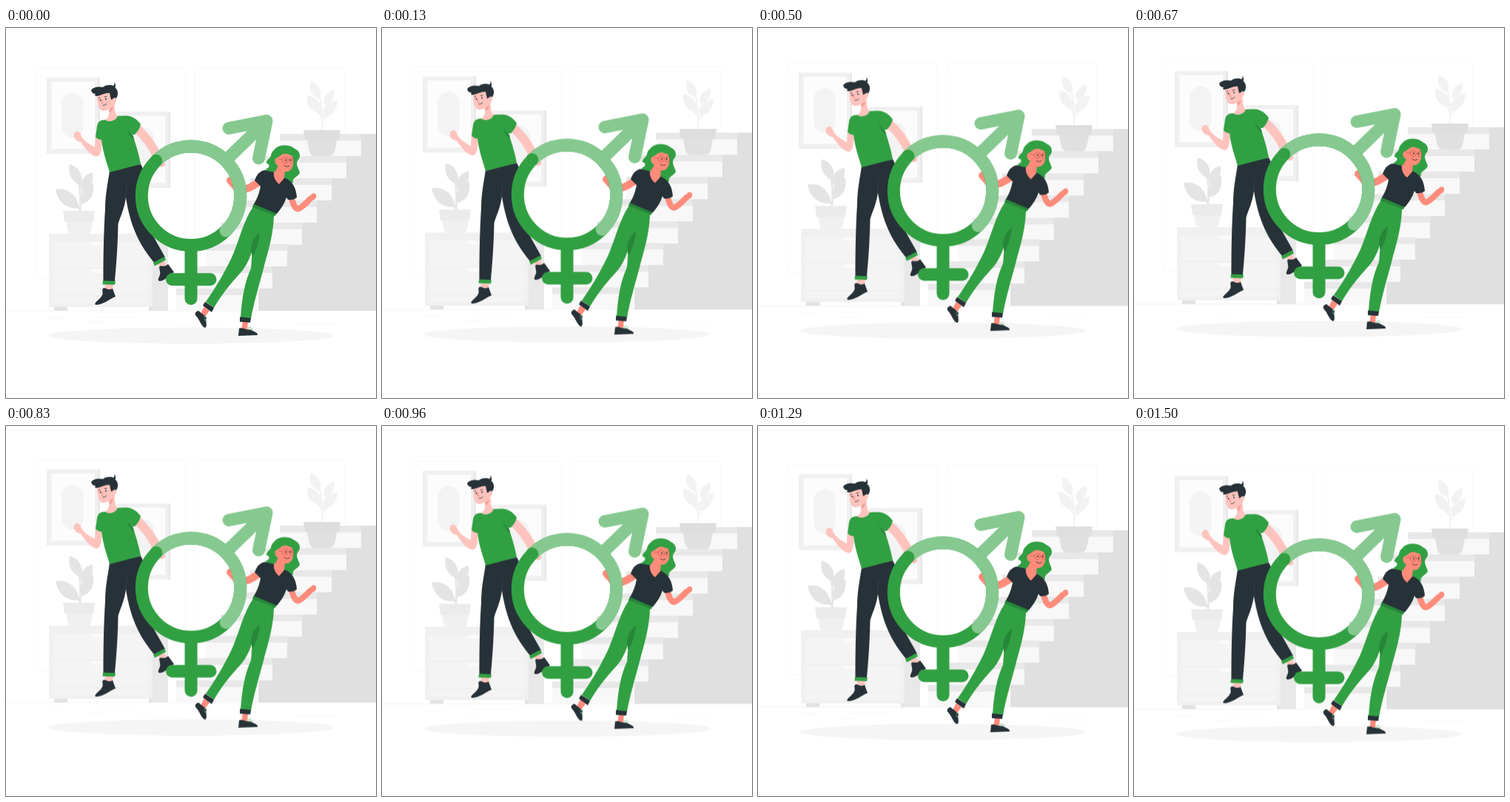
An HTML page without scripts for the animation above (1540 ms loop, 500 px wide and 500 px high).

```html
<!DOCTYPE html>
<html lang="en">
<head>
<meta charset="utf-8">
<title>Floating equality scene</title>
<style>
  html, body { margin: 0; width: 100%; height: 100%; overflow: hidden; background: #fff; }
  svg { display: block; width: 100vw; height: 100vh; }

  .scene { animation: float 1540ms -5ms infinite; }
  @keyframes float {
    0% { transform: translateY(0); animation-timing-function: steps(18); }
    48.64% { transform: translateY(-10px); }
    48.65% { transform: translateY(-9.44px); animation-timing-function: steps(19); }
    100% { transform: translateY(1.11px); }
  }

  .green { fill: #31a042; }
  .shade { fill: #27863a; }
  .dark { fill: #263238; }
  .pale { fill: #ffc3bd; }
  .tan { fill: #ff8b7b; }
  .line { fill: none; stroke-linecap: round; stroke-linejoin: round; }
  .pale-line { stroke: #ffc3bd; }
  .tan-line { stroke: #ff8b7b; }
  .ink { stroke: #263238; stroke-width: .8; }
  .symbol { stroke-width: 17; }
  .deep { stroke: #31a042; }
  .light { stroke: #86c990; }
</style>
</head>
<body>
<svg viewBox="0 0 500 500">
  <defs>
    <g id="step">
      <path fill="#f8f8f8" d="M370 143h110v30H370z"/>
      <path fill="#e8e8e8" d="M370 143h110v9H370z"/>
    </g>
    <g id="picture">
      <path fill="#e8e8e8" d="M55.500 67h71.500v103H55.500z"/>
      <path fill="#f0f0f0" d="M55.500 67h69v103h-69z"/>
      <path fill="#fcfcfc" d="M61 72.500h59v91H61z"/>
      <rect x="75.500" y="88" width="29" height="60" rx="14.500" fill="#f3f3f3"/>
    </g>
    <g id="drawer">
      <path fill="#f4f4f4" d="M63 289h130v35H63z"/>
      <path fill="#fafafa" d="M114 289h18v5h-13q-4 0-5-5z"/>
    </g>
  </defs>

  <g class="scene">
    <g fill="none" stroke="#f8f8f8">
      <rect x="39" y="54" width="203" height="284" rx="4"/>
      <rect x="255" y="54" width="203" height="284" rx="4"/>
      <path stroke="#f1f1f1" d="M0 382h500"/>
      <path d="M57 391.500h23M110 397.500h26M120 390.500h58M392 399.500h56"/>
    </g>

    <use href="#picture"/>
    <use href="#picture" x="95" y="46"/>

    <g id="stairs">
      <path fill="#e0e0e0" d="M480 143h20v239H341v-30h19v-30h20v-30h20v-29h20v-30h20v-30h20v-30h20z"/>
      <use href="#step"/>
      <use href="#step" x="-20" y="30"/>
      <use href="#step" x="-40" y="60"/>
      <use href="#step" x="-60" y="90"/>
      <use href="#step" x="-80" y="120"/>
      <use href="#step" x="-100" y="149"/>
      <use href="#step" x="-120" y="179"/>
      <use href="#step" x="-140" y="209"/>
    </g>

    <g id="stair-plant">
      <path class="line" stroke="#f0f0f0" stroke-width="1.600" d="M427 140C428 120 427 100 421 86M428 113l10-14M427 127l12-13M427 122l-9-14"/>
      <g fill="#f2f2f2">
        <path d="M412 72C423 76 428 86 424 95C413 93 408 83 412 72z"/>
        <path d="M444 83C445 94 440 103 430 104C427 95 433 86 444 83z"/>
        <path d="M407 91C419 93 428 102 427 116C413 115 405 104 407 91z"/>
        <path d="M448 97C448 110 441 119 429 121C427 109 435 100 448 97z"/>
      </g>
      <path fill="#e0e0e0" d="M406 148h42l-4 19q-2 6-8 6h-18q-6 0-8-6z"/>
      <path fill="#dedede" d="M402 138h50l-2 13h-46z"/>
    </g>

    <g id="cabinet">
      <path fill="#e2e2e2" d="M65 376h18v6H65zM193 376h26v6h-26z"/>
      <path fill="#f0f0f0" d="M58 278h140v99H58z"/>
      <path fill="#e8e8e8" d="M198 278h21v104h-21z"/>
      <use href="#drawer"/>
      <use href="#drawer" y="37"/>
      <path fill="#f4f4f4" d="M63 363h130v9H63z"/>
    </g>

    <g id="cabinet-plant">
      <path class="line" stroke="#e4e4e4" stroke-width="2.500" d="M100 250C101 228 101 214 97 199M100 232l10-16M100 245l-14-14"/>
      <g fill="#e4e4e4">
        <path d="M86 184C98 187 105 198 102 213C89 209 83 197 86 184z"/>
        <path d="M117 195C119 208 114 217 102 220C99 207 105 198 117 195z"/>
        <path d="M67 218C83 215 96 225 99 243C83 246 70 236 67 218z"/>
        <path d="M118 209C120 225 114 235 102 238C99 221 106 212 118 209z"/>
      </g>
      <path fill="#f0f0f0" d="M81 260h36l-2 13q-1 6-7 6H90q-6 0-7-6z"/>
      <path fill="#ebebeb" d="M77 247h43l-2 15H79z"/>
    </g>

    <ellipse cx="250" cy="415.700" rx="193.500" ry="11" fill="#f5f5f5"/>

    <g id="man">
      <path class="pale" d="M133 345h12l-1 9-9 1zM205 318l8-4 5 9-8 3z"/>
      <path class="dark" d="M131 352C134 349 137 356 144 352L148 363C140 366 132 374 121 374C118 371 127 367 130 361C132 357 129 355 131 352z"/>
      <path class="dark" d="M207 323C210 319 213 325 219 319L227 330C220 334 215 342 207 342C203 340 210 334 208 329z"/>
      <path class="dark" d="M140 193L182 184C186 191 188 197 187 206C180 230 182 244 190 262C197 280 208 296 215 310L201 318C180 293 168 268 162 229C160 245 154 256 151.500 265C151 295 149 320 147 342H131.500C131.500 310 132 275 134 245C134 225 138 208 140 193z"/>
      <path class="line" stroke="#3b464b" stroke-width=".8" d="M163 211Q163 222 161 231"/>
      <path class="green" d="M131 341.500L148 342L147 347L130.500 346.500zM199 317L214 309L216 313.500L201 321.500z"/>

      <path class="pale" d="M121 145L129 150C130 161 129 171 124 173.500C117 176 107 163 101 154C95 153 90 148 92 143C93 139 99 138 101 144C103 150 110 156 120 161z"/>
      <path class="line pale-line" stroke-width="12" d="M177 136C188 146 198 159 204 173"/>
      <path class="line pale-line" stroke-width="8" d="M204 174L211 184"/>
      <path class="green" d="M135 124C127 124 124 127 123 133L121 147Q124 151 129 151C131 168 136 181 140 195L182 184C180 172 176 159 171 144L174 144C178 140 181 135 182 130C176 122 169 118 161 118.500L149 119z"/>
      <path class="shade" d="M163 135Q166 142 172 146L173 151Q165 145 163 135z"/>
      <path class="pale" d="M138 105L147 97C146 107 147 116 151 119C148 126 139 128 134 124C140 121 140 114 138 105z"/>
      <path fill="#f2a19a" d="M139 110L145 106Q144 112 140 114z"/>
      <path class="pale" d="M123 89C123 100 124 111 131 112C137 112 141 109 143 103C150 102 151 94 146 94L142 84z"/>
      <path class="dark" d="M115 84C119 79 126 79 131 80C134 77 141 76 145 78Q147 77 146.500 73Q149 77 147.500 80.500C152 84 152 91 149 95Q146 93 144 96L142 97L140 88C134 87 128 92 122 92Q119 92 121 89Q116 89 115 84z"/>
      <ellipse class="dark" cx="127.500" cy="97.500" rx=".8" ry="1.200"/>
      <ellipse class="dark" cx="135" cy="96" rx=".8" ry="1.200"/>
      <path class="line ink" d="M125 95l2-1M133 93l3-.5M131 104.500Q134 105 136 102.500"/>
      <path class="line" stroke="#ed847e" stroke-width=".9" d="M130 97l-1 4 2 .3"/>
    </g>

    <g id="woman">
      <path class="tan" d="M268 376l7 6-6 8-6-4zM320 396h7l-1 12h-8z"/>
      <path class="dark" d="M260 382L271 391C269 395 273 404 269 405C264 404 262 394 256 388C255 385 257 383 260 382z"/>
      <path class="dark" d="M315 406C320 404 325 409 330 407C333 410 341 411 340 415L314 416z"/>
      <path class="line light" d="M268 391l3-1M268 394l2 1M327 406l4-2M329 408l4-2"/>

      <path class="green" d="M335 238L366 249L362 255C361 282 353 305 348 325C342 348 335 370 331 393L317 391C319 365 322 345 331 325L333 300C328 315 323 325 314 334C302 347 291 361 281 378L270 370C286 347 296 329 306 308C316 284 321 261 333 243z"/>
      <path class="shade" d="M343 276C335 283 331 291 331 300L333 310C339 298 342 288 343 276z"/>
      <path class="shade" d="M335 237L366 249L364 254L333 242z"/>
      <path class="dark" d="M269 370L281 378L278 384L266 375zM316 390.500L331 392L330 398L316 397z"/>

      <path class="green" d="M363 164C369 157 383 157 390 163C398 166 399 175 394 179C391 185 396 190 397 196C393 202 386 203 388 209C382 211 374 207 370 203L361 195C356 197 351 195 351 191C357 188 357 184 352 183C352 177 358 176 358 172Q359 167 363 164z"/>
      <path class="line tan-line" stroke-width="10" d="M342 208C330 216 320 222 311 215L303 206"/>
      <path class="line tan-line" stroke-width="8" d="M386 230C388 238 391 246 396 244C402 241 406 236 411 231"/>
      <ellipse class="tan" cx="415" cy="228" rx="4" ry="5" transform="rotate(35 415 228)"/>
      <path class="dark" d="M349 192L362 195L378 203C387 207 392 216 393 229Q388 233 381 232L379 229C376 238 371 245 366 251L335 238C339 231 342 224 344 214L336 206Q340 194 349 192z"/>
      <path class="tan" d="M368 184L377 192L376 203L369 211C364 207 361 201 362 195Q367 191 368 184z"/>
      <path class="tan" d="M370 173C376 168 384 169 387 173C390 183 388 191 381 194C374 195 370 190 368 186C362 185 362 175 367 175z"/>
      <path class="green" d="M366 176C367 169 376 167 382 171Q387 171 389 177L392 170L384 163L370 164L362 172z"/>
      <g fill="none" stroke="#a8483f" stroke-width=".5">
        <ellipse cx="377.500" cy="178.500" rx="3.800" ry="4"/>
        <ellipse cx="386" cy="179" rx="3" ry="3.800"/>
        <path d="M381.300 178h1.700M373.700 178l-6-1"/>
      </g>
      <ellipse class="dark" cx="378" cy="178.500" rx=".8" ry="1.200"/>
      <ellipse class="dark" cx="385" cy="178.500" rx=".8" ry="1.200"/>
      <path class="line ink" d="M376 186Q379 189 383 186.500"/>
    </g>

    <g id="symbol" class="line symbol">
      <path class="deep" d="M250 296V365.700M224.500 339.700H276"/>
      <path class="light" d="M301 175L352 125.500M301 135.500L352 125.500L341.500 176"/>
      <circle class="deep" cx="250" cy="226.800" r="66.700"/>
      <path class="light" d="M202.800 179.600A66.700 66.700 0 0 1 297.200 274"/>
      <path class="deep" d="M202.800 179.600h.01"/>
    </g>
  </g>
</svg>
</body>
</html>
```
